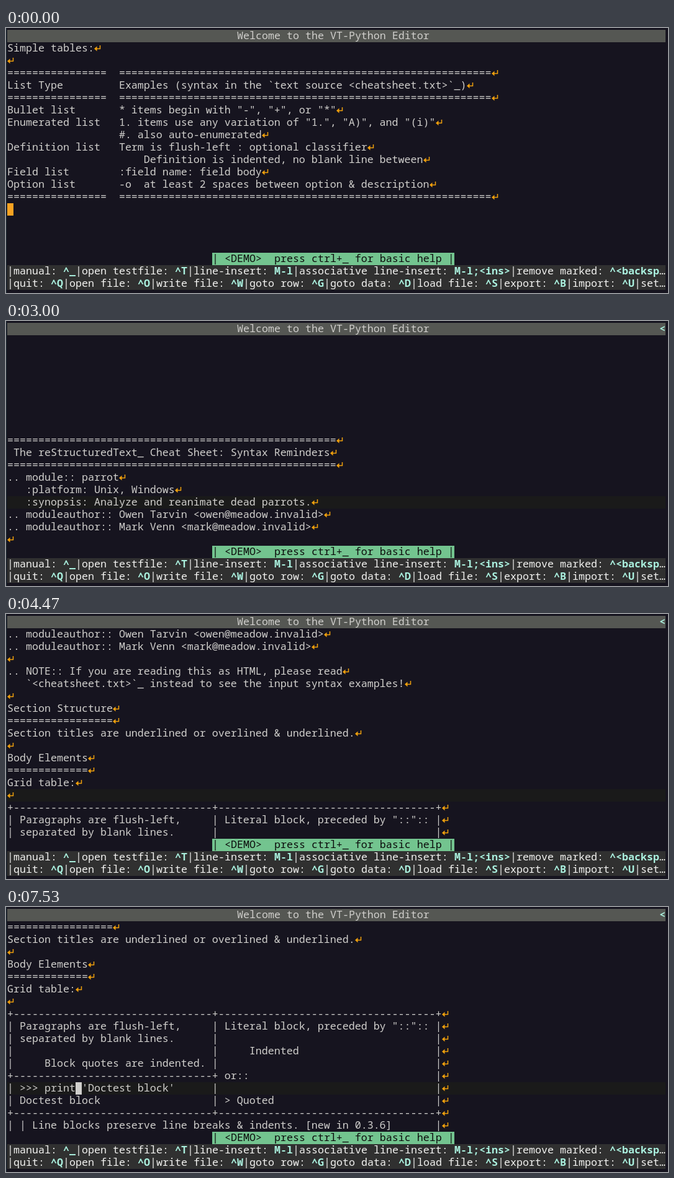
These frames come from a looping animation (1066 px wide and 428 px high, 8 s). An HTML page with a canvas:

```html
<!DOCTYPE html>
<html lang="en">
<head>
<meta charset="utf-8">
<title>Terminal editor</title>
<style>
html, body { margin: 0; width: 100%; height: 100%; overflow: hidden; background: #16141f; }
canvas { display: block; }
</style>
</head>
<body>
<canvas id="stage" width="1066" height="428"></canvas>
<script>
const ctx = document.getElementById('stage').getContext('2d');
const LOOP = 8000, COLS = 106, CURSOR_ROW = 14, PROMPT_ROW = 18;
const BG = '#16141f', FG = '#d0cfcc', WHITE = '#f2f2f0', KEY = '#aaf0de', ORANGE = '#f9a322';
const FONT = '16.6667px "Noto Sans Mono", "DejaVu Sans Mono", monospace';

const split = (a, b) => a.padEnd(18) + b;
const cells = (a, b) => '|' + a.padEnd(32) + '|' + b.padEnd(35) + '|';
const border = '+' + '-'.repeat(32) + '+' + '-'.repeat(35) + '+';
const rule = split('='.repeat(16), '='.repeat(60));

const tail = [
  'Simple tables:', '', rule,
  split('List Type', 'Examples (syntax in the `text source <cheatsheet.txt>`_)'),
  rule,
  split('Bullet list', '* items begin with "-", "+", or "*"'),
  split('Enumerated list', '1. items use any variation of "1.", "A)", and "(i)"'),
  split('', '#. also auto-enumerated'),
  split('Definition list', 'Term is flush-left : optional classifier'),
  split('', '    Definition is indented, no blank line between'),
  split('Field list', ':field name: field body'),
  split('Option list', '-o  at least 2 spaces between option & description'),
  rule
];

const head = [
  '='.repeat(53),
  ' The reStructuredText_ Cheat Sheet: Syntax Reminders',
  '='.repeat(53),
  '.. module:: parrot',
  '   :platform: Unix, Windows',
  '   :synopsis: Analyze and reanimate dead parrots.',
  '.. moduleauthor:: Owen Tarvin <owen@meadow.invalid>',
  '.. moduleauthor:: Mark Venn <mark@meadow.invalid>',
  '',
  '.. NOTE:: If you are reading this as HTML, please read',
  '   `<cheatsheet.txt>`_ instead to see the input syntax examples!',
  '',
  'Section Structure',
  '='.repeat(17),
  'Section titles are underlined or overlined & underlined.',
  '',
  'Body Elements',
  '='.repeat(13),
  'Grid table:',
  '',
  border,
  cells(' Paragraphs are flush-left,', ' Literal block, preceded by "::"::'),
  cells(' separated by blank lines.', ''),
  cells('', '     Indented'),
  cells('     Block quotes are indented.', ''),
  '+' + '-'.repeat(32) + '+' + ' or::'.padEnd(35) + '|',
  cells(" >>> print 'Doctest block'", ''),
  cells(' Doctest block', ' > Quoted'),
  border,
  '| | Line blocks preserve line breaks & indents. [new in 0.3.6]'.padEnd(69) + '|'
];

const mainMenu = [
  ['manual: ^_', 'open testfile: ^T', 'line-insert: M-l',
   'associative line-insert: M-l;<ins>', 'remove marked: ^<backsp'],
  ['quit: ^Q', 'open file: ^O', 'write file: ^W', 'goto row: ^G', 'goto data: ^D',
   'load file: ^S', 'export: ^B', 'import: ^U', 'set']
];
const promptMenu = [
  ['execute: <enter>', 'clear buffer: ^<backspace>'],
  ['cancel: <ESC>', 'history: ▲▼']
];

// Event times in ms
const PROMPT = 1720, DIGIT = 2000, ENTER = 2340, MARK = 7470;
const blinks = [340, 940, 1530, 2130, 2730, 3340, 3940, 4530, 5130, 5720, 6340, 6940, 7530];
const downs = [2590, 2660, 2800, 2870, 2990, 3060, 3190,
  3420, 3530, 3640, 3740, 3840, 3940, 4060,
  4190, 4260, 4330, 4400, 4470, 4600, 4660, 4810, 4880, 5130, 5470, 5810];
const rights = [6060, 6150, 6250, 6400, 6500, 6600, 6700, 6800, 6900, 7060, 7280];
const passed = (times, t) => times.filter(x => x <= t).length;

const px = col => 2 + col * 10;
const py = row => 3 + row * 20;

function box(col, row, w, h, color) {
  ctx.fillStyle = color;
  ctx.fillRect(px(col), py(row), w * 10, h * 20);
}

function text(s, col, row, color = FG, bold = false) {
  ctx.font = (bold ? 'bold ' : '') + FONT;
  ctx.fillStyle = color;
  ctx.fillText(s, px(col), py(row) + 15);
}

function lineEnd(col, row) {
  const x = px(col), y = py(row);
  ctx.strokeStyle = ctx.fillStyle = '#f0a00c';
  ctx.lineWidth = 1.5;
  ctx.beginPath();
  ctx.moveTo(x + 9.5, y + 5);
  ctx.lineTo(x + 9.5, y + 10.5);
  ctx.lineTo(x + 3, y + 10.5);
  ctx.stroke();
  ctx.beginPath();
  ctx.moveTo(x, y + 10.5);
  ctx.lineTo(x + 4.5, y + 6.5);
  ctx.lineTo(x + 4.5, y + 14.5);
  ctx.fill();
}

function line(s, row) {
  text(s, 0, row);
  lineEnd(s.length, row);
}

function menu(rows, cut) {
  box(0, 19, COLS, 2, '#303030');
  rows.forEach((items, i) => {
    let col = 0;
    for (const item of items) {
      const [label, key] = item.split(': ');
      const lead = '|' + label + (key ? ': ' : '');
      text(lead, col, 19 + i, WHITE);
      col += lead.length;
      for (const c of key || '') text(c, col++, 19 + i, KEY, true);
    }
    if (cut) text('…', COLS - 1, 19 + i, WHITE);
  });
}

function draw(t) {
  const prompting = t >= PROMPT && t < ENTER;
  const atHead = t >= ENTER;
  const current = passed(downs, t);
  let col = passed(rights, t), row = CURSOR_ROW, under = '';

  ctx.fillStyle = BG;
  ctx.fillRect(0, 0, 1066, 428);
  ctx.fillStyle = '#22323a';
  ctx.fillRect(0, 0, 1, 428);

  box(0, 0, COLS, 1, '#555753');
  text('Welcome to the VT-Python Editor', 37, 0);
  if (t >= PROMPT) text('<', COLS - 1, 0, KEY, true);

  if (atHead) {
    box(0, CURSOR_ROW, COLS, 1, '#1a1a1a');
    for (let r = 1; r < PROMPT_ROW; r++) {
      const s = head[current + r - CURSOR_ROW];
      if (s !== undefined) line(s, r);
    }
    under = head[current][col] || '';
  } else {
    tail.forEach((s, i) => line(s, i + 1));
  }

  if (prompting) {
    box(0, PROMPT_ROW, 9, 1, '#262722');
    text('Goto row:', 0, PROMPT_ROW, WHITE);
    if (t >= DIGIT) text('0', 10, PROMPT_ROW);
    col = t >= DIGIT ? 11 : 10;
    row = PROMPT_ROW;
    menu(promptMenu);
  } else {
    box(33, PROMPT_ROW, 39, 1, '#73c48f');
    text('| <DEMO>  press ctrl+_ for basic help |', 33, PROMPT_ROW, '#0c0c0c');
    menu(mainMenu, true);
  }

  if (t >= MARK) box(col, row, 1, 1, FG);
  if (passed(blinks, t) % 2 === 0) {
    box(col, row, 1, 1, ORANGE);
    text(under, col, row, '#ffc64a');
  }
}

const start = performance.now();
function tick() {
  draw((performance.now() - start) % LOOP);
  requestAnimationFrame(tick);
}
tick();
</script>
</body>
</html>
```
